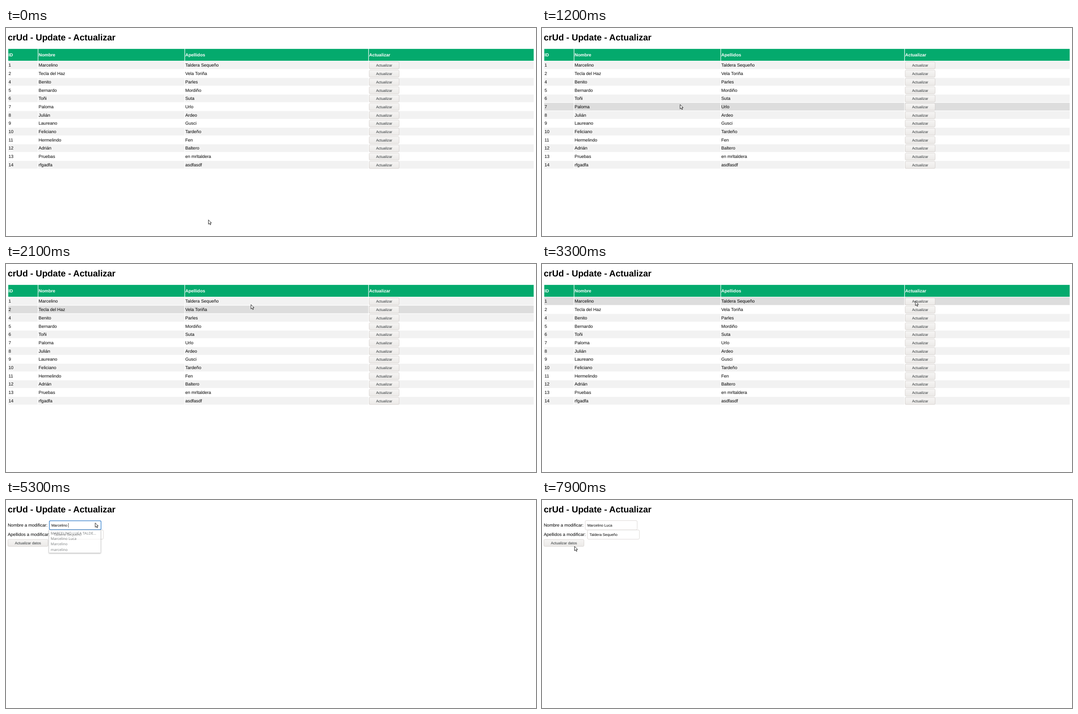
An HTML page for the animation above (8 s loop, 1195x469 px).

```html
<!DOCTYPE html>
<html lang="es">
<head>
<meta charset="utf-8">
<title>crUd - Update - Actualizar</title>
<style>
  html, body { margin: 0; width: 100%; height: 100%; overflow: hidden; background: #fff; }
  svg { display: block; width: 1195px; height: 469px; }
  text { font: 9.98px "Liberation Sans", Arial, sans-serif; text-rendering: geometricPrecision; white-space: pre; }
  .title { font-size: 19.96px; font-weight: bold; }
  .head { font-weight: bold; fill: #fff; }
  .small { font-size: 8.31px; }
  .label { font-size: 8.31px; fill: #2e3436; text-anchor: middle; }
  .item { font: 8.2px "Noto Sans", "Open Sans", sans-serif; fill: #2e3436; }
  .box { stroke: #c9c3be; stroke-width: .65; }
  #list rect { filter: drop-shadow(0 1.2px 1.5px #0008); }
</style>
</head>
<body>
<svg id="stage" viewBox="0 0 1195 469">
  <defs>
    <linearGradient id="face" x2="0" y2="1"><stop stop-color="#f6f5f4"/><stop offset="1" stop-color="#ebe9e7"/></linearGradient>
    <linearGradient id="lit" x2="0" y2="1"><stop stop-color="#fcfcfb"/><stop offset="1" stop-color="#f6f5f4"/></linearGradient>
  </defs>
  <text class="title" x="3.9" y="28">crUd - Update - Actualizar</text>
  <g id="table"></g>
  <g id="form"></g>
  <path id="cursor" d="M.4 .6V10.4L2.7 8.3 4.3 11.9 6 11.1 4.4 7.6H7.3Z" fill="#fff" stroke="#111" stroke-width=".95"/>
</svg>
<script>
const $ = id => document.getElementById(id);
const table = $('table'), form = $('form'), cursor = $('cursor');

function add(parent, tag, attrs, content = '') {
  const node = document.createElementNS('http://www.w3.org/2000/svg', tag);
  for (const key in attrs) node.setAttribute(key, attrs[key]);
  node.textContent = content;
  return parent.appendChild(node);
}
const write = (parent, x, y, content, cls = '') => add(parent, 'text', { x, y, class: cls }, content);
const box = (parent, x, y, width, height, fill = '#fff', rx = 2.6) =>
  add(parent, 'rect', { x, y, width, height, fill, rx, class: 'box' });
function button(parent, x, y, width, height, label) {
  const face = box(parent, x, y, width, height, 'url(#face)', 2.3);
  write(parent, x + width / 2, y + height / 2 + 3.1, label, 'label');
  return face;
}
const show = (node, visible) => node.setAttribute('visibility', visible ? 'visible' : 'hidden');

// Table
const FIRST = 'Marcelino', ADDED = ' Luca', LAST = 'Taldera Sequeño';
const people = [
  [1, FIRST, LAST], [2, 'Tecla del Haz', 'Vela Toriña'], [4, 'Benito', 'Parles'],
  [5, 'Bernardo', 'Mordiño'], [6, 'Toñi', 'Suta'], [7, 'Paloma', 'Urlo'],
  [8, 'Julián', 'Ardeo'], [9, 'Laureano', 'Gusci'], [10, 'Feliciano', 'Tardeño'],
  [11, 'Hermelindo', 'Fen'], [12, 'Adrián', 'Baltero'], [13, 'Pruebas', 'en mrltaldera'],
  [14, 'rfgadfa', 'asdfasdf']
];
const edges = [5.1, 72.9, 403.6, 818.1, 1191];
const ROW_TOP = 75.1, PITCH = 18.708, ROW_HEIGHT = 17.46;

function cells(y, height, fill) {
  const group = add(table, 'g', { fill });
  edges.slice(0, 4).forEach((x, i) =>
    add(group, 'rect', { x, y, width: edges[i + 1] - x - 1.25, height }));
  return group;
}
cells(47.1, 26.8, '#04aa6d');
['ID', 'Nombre', 'Apellidos', 'Actualizar'].forEach((name, i) =>
  write(table, edges[i] + .6, 64.1, name, 'head'));

const rows = people.map((person, k) => {
  const y = ROW_TOP + k * PITCH;
  const back = cells(y, ROW_HEIGHT, '#fff');
  person.forEach((value, i) => write(table, edges[i] + .6, y + 12.3, value));
  return { back, face: button(table, 818.9, y + 1.2, 67.5, 16, 'Actualizar') };
});

// Form
write(form, 3.9, 60.2, 'Nombre a modificar:');
write(form, 3.9, 81.3, 'Apellidos a modificar:');
box(form, 97.4, 46.4, 117.2, 20.9);
box(form, 102.4, 67.6, 117.2, 20.8);
write(form, 107.3, 81, LAST, 'small');
button(form, 4.3, 88.9, 90.3, 15.7, 'Actualizar datos');
const ring = add(form, 'rect', { x: 97.7, y: 46.8, width: 116.6, height: 20.2, rx: 2.4, fill: 'none', stroke: '#2f7fd0', 'stroke-width': 1.3 });
const field = write(form, 102.2, 60, FIRST, 'small');
const caret = add(form, 'rect', { y: 52, width: .7, height: 10, fill: '#000' });
const list = add(form, 'g', { id: 'list' });
const panel = add(list, 'rect', { x: 96.9, y: 67.5, width: 116.6, fill: '#fff', stroke: '#aaa', 'stroke-width': .5 });
const items = [(FIRST + ADDED).toUpperCase() + ' TALDE…', FIRST + ADDED, FIRST, FIRST.toLowerCase()]
  .map((name, i) => write(list, 100.8, 77.6 + i * 12.4, name, 'item'));

// Pointer path: time, x, y
const path = [
  [0, 456, 432], [500, 370, 290], [900, 315, 219], [1100, 308, 184], [1200, 311, 172],
  [1500, 361, 126], [1600, 382, 116], [1800, 440, 101], [2400, 664, 81], [2600, 664, 81],
  [3300, 841.5, 83.5], [3900, 841.5, 83.5], [4100, 839.5, 89], [4300, 690, 78], [4500, 420, 55],
  [4700, 222, 45], [4800, 200.7, 51], [6900, 200.7, 51], [7200, 165, 112], [7500, 122, 140],
  [7800, 81, 109], [7900, 73, 104]
];
function pointer(t) {
  const i = path.findIndex(p => p[0] > t);
  if (i < 0) return path[path.length - 1].slice(1);
  const [t0, x0, y0] = path[Math.max(0, i - 1)], [t1, x1, y1] = path[i];
  const u = Math.max(0, (t - t0) / (t1 - t0));
  return [x0 + (x1 - x0) * u, y0 + (y1 - y0) * u];
}

const typedAt = [5300, 5800, 6100, 6300, 6500];

function draw(t) {
  const [x, y] = pointer(t);
  cursor.setAttribute('transform', `translate(${x} ${y})`);
  const editing = t >= 4000;
  show(table, !editing);
  form.style.display = editing ? '' : 'none';

  if (!editing) {
    // Hover trails the pointer by one tick
    const [hx, hy] = pointer(Math.max(0, t - 100));
    rows.forEach(({ back, face }, k) => {
      const top = ROW_TOP + k * PITCH, over = hy >= top && hy < top + PITCH;
      back.setAttribute('fill', over ? '#ddd' : k % 2 ? '#fff' : '#f2f2f2');
      face.setAttribute('fill', over && hx > 819 && hx < 886 ? 'url(#lit)' : 'url(#face)');
    });
    return;
  }
  const focused = t >= 4900 && t < 7500;
  show(ring, focused);
  ring.setAttribute('opacity', t < 5000 ? .5 : 1);
  field.textContent = FIRST + ADDED.slice(0, typedAt.filter(at => t >= at).length);
  show(caret, focused && t >= 5000);
  caret.setAttribute('x', 102.2 + field.getComputedTextLength());

  list.style.display = focused && t >= 5300 ? '' : 'none';
  list.setAttribute('opacity', t < 5400 ? .6 : 1);
  const count = t < 5800 ? 4 : 2;
  panel.setAttribute('height', 2 + count * 12.4);
  items.forEach((item, i) => { item.style.display = i < count ? '' : 'none'; });
}

function tick() {
  draw(Math.floor(performance.now() % 8000 / 100) * 100);
  requestAnimationFrame(tick);
}
tick();
</script>
</body>
</html>
```
